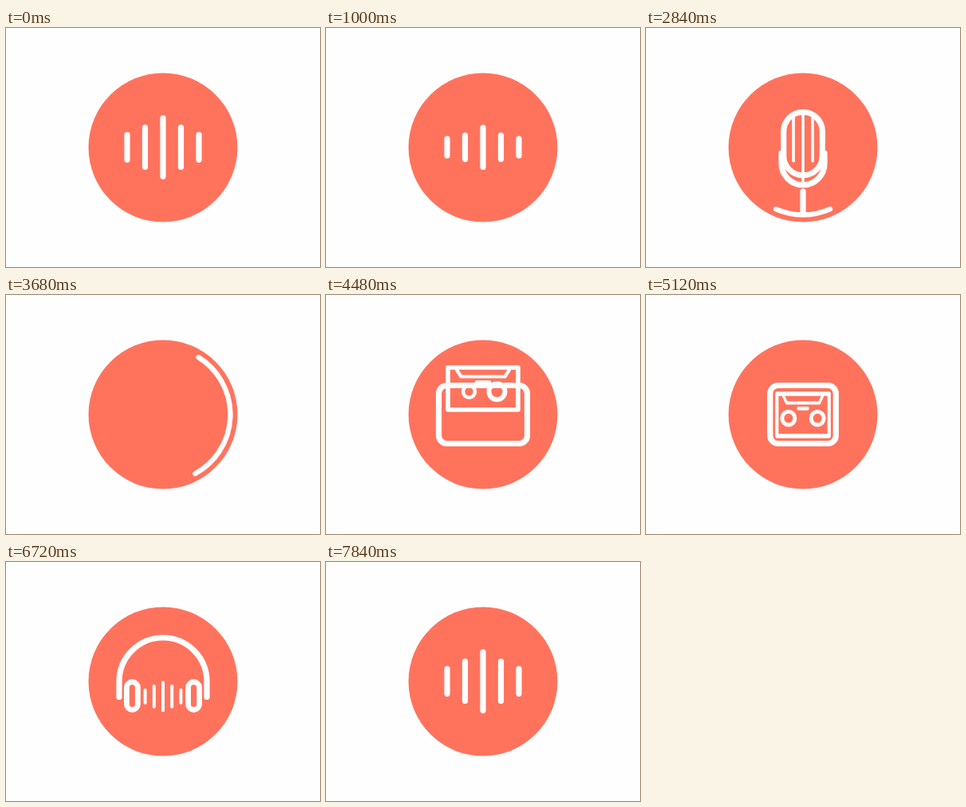
Write an HTML page that moves like this. It is 394x300 px and loops after 7960 ms.

```html
<!DOCTYPE html>
<html lang="en">
<head>
<meta charset="utf-8">
<title>Audio icons</title>
<style>
html, body { margin: 0; width: 100%; height: 100%; overflow: hidden; background: #fefefe; }
svg { display: block; width: 100vw; height: 100vh; }
</style>
</head>
<body>
<svg id="stage" viewBox="0 0 394 300">
  <circle cx="197" cy="150" r="93.5" fill="#ff735d"/>
  <g id="art" fill="none" stroke="#fff" stroke-width="7.2" stroke-linecap="round" stroke-linejoin="round"></g>
</svg>
<script>
const LOOP = 7960, STEP = 40, CX = 197, CY = 150;
const art = document.getElementById('art');

function add(tag, attrs = {}, parent = art) {
  const el = document.createElementNS('http://www.w3.org/2000/svg', tag);
  set(el, attrs);
  parent.appendChild(el);
  return el;
}
function set(el, attrs) {
  for (const name in attrs) el.setAttribute(name, attrs[name]);
}
const show = (el, on) => set(el, { visibility: on ? 'visible' : 'hidden' });
const clamp = v => Math.max(0, Math.min(1, v));
const lerp = (a, b, p) => a + (b - a) * p;
const ease = p => p < .5 ? 4 * p * p * p : 1 - Math.pow(2 - 2 * p, 3) / 2;
const during = (t, a, b) => t >= a && t < b;

// Eased value through time/value pairs
function key(t, ...k) {
  if (t <= k[0]) return k[1];
  for (let i = 2; i < k.length; i += 2) {
    if (t < k[i]) return lerp(k[i - 1], k[i + 1], ease((t - k[i - 2]) / (k[i] - k[i - 2])));
  }
  return k[k.length - 1];
}
function trim(el, from, to) {
  show(el, to - from > .002);
  set(el, { 'stroke-dasharray': `${Math.max(0, to - from)} 3`, 'stroke-dashoffset': -from });
}
const drawn = (d, attrs, parent) => add('path', { d, pathLength: 1, ...attrs }, parent);

// Microphone
const mic = add('g');
const head = add('g', {}, mic);
const capsule = drawn('M172.7 164V129.8A24.3 24.3 0 0 1 221.3 129.8V160.5A24.3 24.3 0 0 1 172.7 160.5Z', {}, head);
const holder = drawn('', {}, mic);
const stem = add('line', { x1: CX, x2: CX, y1: 205 }, mic);
const base = add('path', { 'stroke-width': 6.4 });

// Cassette
const tape = add('g', { 'stroke-width': 5.6 });
const shell = drawn('M197 144H153V91H241V144Z', {}, tape);
const notch = add('path', { d: 'M164 94L169.500 102.500H224.500L230 94', 'stroke-width': 4.2 }, tape);
const slot = add('line', { x1: 189, x2: 205, y1: 109.500, y2: 109.500, 'stroke-width': 4.6 }, tape);
const frame = add('rect', { pathLength: 1 });

// Headphones
const reels = [-1, 1].map(() => add('rect'));
const band = drawn('M142 169.500V150A55 55 0 0 1 252 150V169.500');
const bars = [0, 1, 2, 3, 4].map(() => add('line'));

const HALF = [15.6, 24.8, 36.6, 24.8, 15.6];
const wide = (i, scale) => ({ x: 152 + 22.5 * i, top: 149.7 - HALF[i] * scale, bottom: 149.7 + HALF[i] * scale, w: 7.2 });

function waveBar(i, t) {
  const order = Math.abs(i - 2);
  const pulse = start => Math.sin(Math.PI * clamp((t - start - order * 80) / 560)) ** 2;
  return wide(i, 1 - .5 * pulse(40) - .4 * pulse(640) + .25 * (order ? 0 : pulse(1120)));
}
function micBar(i, dy) {
  const outer = i === 0 || i === 4;
  return {
    x: 173 + 12 * i,
    top: (outer ? 136 : i === 2 ? 106 : 109) + dy,
    bottom: (outer ? 164 : i === 2 ? 192 : 167) + dy,
    w: outer ? 7 : 3.6
  };
}
function smallBar(i, t) {
  const order = Math.abs(i - 2), half = [17.5, 13, 8][order];
  const grow = i === 2 ? 1 : key(t, 5840 + order * 60, 0, 6160 + order * 60, 1);
  const beat = 1 - .4 * Math.sin((t - 6720) * Math.PI / 320 + (t < 6720 ? order * .3 : 0)) ** 2;
  const h = half * grow * beat;
  return { x: CX + (i - 2) * 11.2, top: 168.8 - h, bottom: 168.8 + h, w: 4 * grow };
}
function blend(a, b, p) {
  const out = {};
  for (const name in a) out[name] = lerp(a[name], b[name], p);
  return out;
}
function barAt(i, t, dy) {
  if (t < 1600) return waveBar(i, t);
  if (t < 3600) return blend(waveBar(i, 1600), micBar(i, dy), key(t, 1600, 0, 1840, 1));
  if (t < 6960) return blend(wide(i, 1), smallBar(i, t), key(t, 5680, 0, 6040, 1));
  const stretch = key(t, 6960, 1, 7240, i === 2 ? 1.25 : 1.1, 7480, .94, 7720, 1);
  return blend(smallBar(i, t), wide(i, stretch), key(t, 6960, 0, 7280, 1));
}

function drawMic(t) {
  const on = during(t, 1640, 3640);
  set(mic, { display: on ? 'inline' : 'none' });
  const dy = key(t, 1840, 0, 2120, -27, 2360, -22, 2560, -22, 2840, 0);
  const out = key(t, 3240, 1, 3600, .001);
  set(mic, { transform: `translate(${CX} ${CY}) scale(${out}) translate(${-CX} ${-CY})` });
  set(head, { transform: `translate(0 ${dy})` });
  trim(capsule, 0, key(t, 1660, .1, 1840, .465, 2080, 1));

  const r = key(t, 2560, 34.5, 2840, 27);
  const cy = key(t, 2560, 171, 2840, 170);
  const top = key(t, 2080, 153, 2840, 157);
  set(holder, { d: `M${CX - r} ${top}V${cy}A${r} ${r} 0 0 0 ${CX + r} ${cy}V${top}` });
  trim(holder, key(t, 1660, 1, 1840, .235, 2000, 0), 1);

  set(stem, { y2: key(t, 1760, 205, 1840, 208.500, 2080, 231, 2960, 231, 3240, 205) });
  show(stem, during(t, 1760, 3240));

  // The foot lies on a circle around the stage centre, so it can orbit.
  const span = key(t, 1920, 0, 2160, 35, 2360, 23.7, 3240, 23.7, 3640, 60, 4000, 22, 4160, 0);
  const turn = key(t, 2360, 0, 2520, -8, 2760, 0, 2920, 0, 3200, 15, 4000, 360);
  const point = a => {
    const rad = (90 + turn + a) * Math.PI / 180;
    return `${CX + 84.5 * Math.cos(rad)} ${CY + 84.5 * Math.sin(rad)}`;
  };
  set(base, { d: `M${point(-span)}A84.5 84.5 0 0 1 ${point(span)}` });
  show(base, during(t, 1960, 4160));
  return dy;
}

function drawTape(t) {
  const fold = key(t, 4960, 1, 5360, 0);
  const drop = key(t, 4240, 0, 4360, -4, 4480, 0, 4680, 33);
  const on = during(t, 3920, 5280);
  set(tape, {
    display: on ? 'inline' : 'none',
    transform: `translate(${CX * (1 - fold)} ${drop}) scale(${Math.max(fold, .001)} 1)`
  });
  trim(shell, 0, key(t, 3920, 0, 4280, 1));
  const detail = key(t, 4160, 0, 4360, 1);
  set(notch, { 'stroke-width': 4.2 * detail });
  set(slot, { x1: CX - 8 * detail, x2: CX + 8 * detail, 'stroke-width': 4.6 * detail });

  const w = 111 * fold;
  set(frame, { x: CX - w / 2, y: 113.500, width: w, height: 73, rx: Math.min(10, w / 2) });
  trim(frame, 0, key(t, 3680, 0, 4160, 1));
  if (!during(t, 3680, 5360)) show(frame, false);
  return drop;
}

function drawReels(t, drop) {
  reels.forEach((reel, i) => {
    const side = i ? 1 : -1;
    const pop = i ? key(t, 4240, 0, 4480, 1.25, 4640, 1) : key(t, 4320, 0, 4480, .93, 4640, 1);
    const cup = key(t, 5040, 0, 5440, 1);
    const merge = key(t, 6960, 0, 7280, 1);
    const d = 16 * pop;
    const w = lerp(lerp(d, 14, cup), 0, merge);
    const h = lerp(lerp(d, 35, cup), 31, merge);
    const x = CX + side * lerp(lerp(17.5, 38.6, cup), 45, merge);
    const y = lerp(lerp(121.3 + drop, 168, cup), 149.7, merge);
    set(reel, {
      x: x - w / 2, y: y - h / 2, width: w, height: h, rx: Math.min(w, h) / 2,
      'stroke-width': lerp(4.8 * pop, 6.8, cup)
    });
    show(reel, during(t, 4280, 7280));
  });
}

function draw(t) {
  const dy = drawMic(t);
  drawReels(t, drawTape(t));
  const reach = key(t, 5400, 0, 5560, .138, 5880, .5, 7340, .5, 7640, 0);
  trim(band, .5 - reach, .5 + reach);

  bars.forEach((bar, i) => {
    const b = barAt(i, t, dy);
    const fade = during(t, 3240, 3600) ? key(t, 3240, 1, 3600, 0) : 1;
    set(bar, {
      x1: lerp(CX, b.x, fade), x2: lerp(CX, b.x, fade),
      y1: lerp(CY, b.top, fade), y2: lerp(CY, b.bottom, fade),
      'stroke-width': b.w * fade
    });
    const outer = i === 0 || i === 4;
    const inMic = t < (outer ? 1920 : 3600);
    show(bar, inMic || t >= (i === 2 ? 5340 : 5840));
  });
}

function tick() {
  const t = performance.now() % LOOP;
  draw(Math.floor(t / STEP) * STEP);
  requestAnimationFrame(tick);
}
tick();
</script>
</body>
</html>
```
